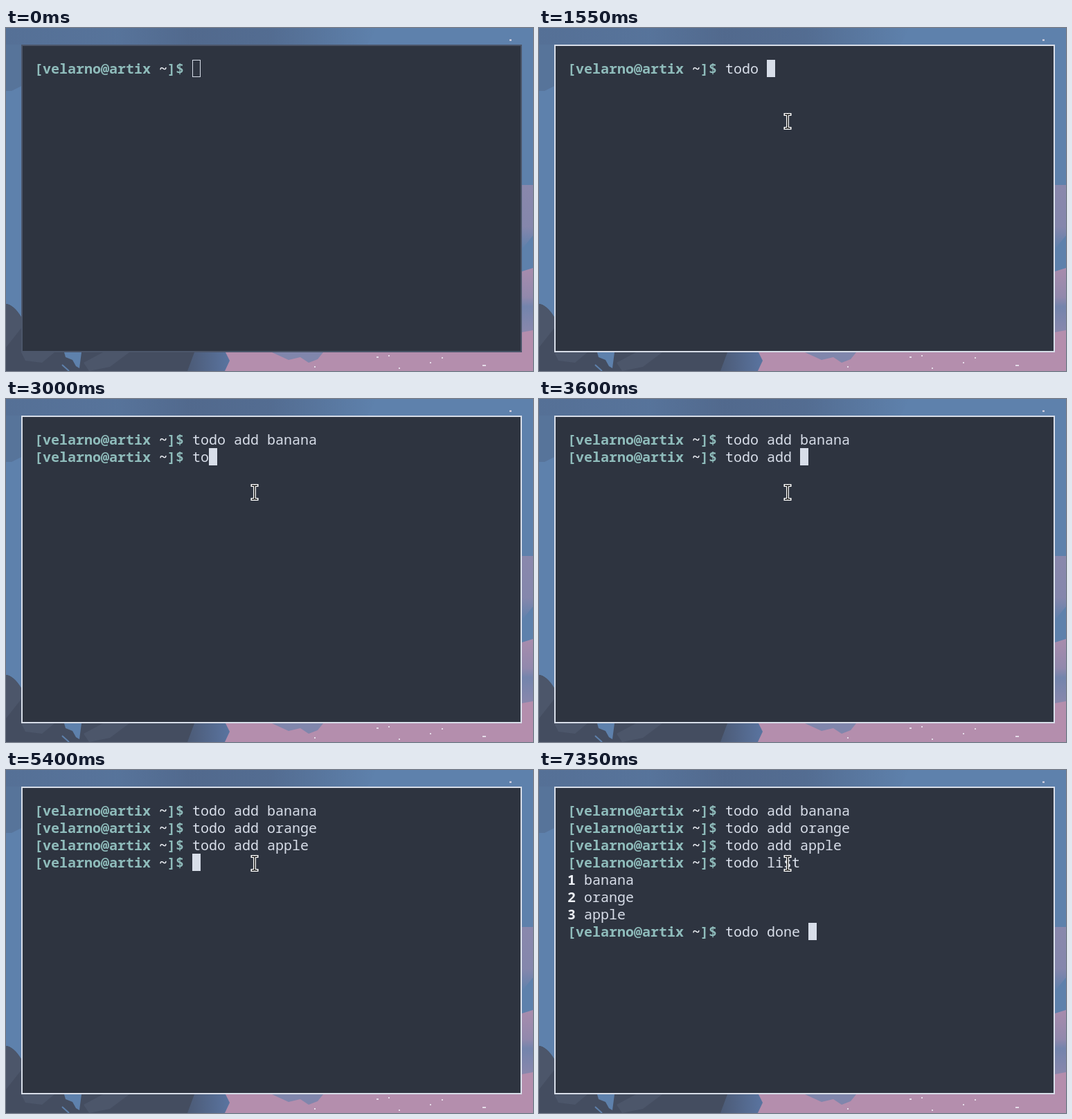
An HTML page that plays this animation: 761 by 496 pixels, repeating every 8 s.

```html
<!DOCTYPE html>
<html lang="en">
<head>
<meta charset="utf-8">
<title>Todo in the terminal</title>
<style>
  html, body { margin: 0; width: 100%; height: 100%; overflow: hidden; background: #5e81ac; }
  svg, #term, #screen, #cursor { position: absolute; box-sizing: border-box; }
  svg { left: 0; top: 0; }
  #term { left: 22px; top: 24px; width: 723px; height: 445px; background: #2e3440; border: 2px solid #4c566a; }
  #screen { left: 41px; top: 46px; margin: 0; color: #d8dee9; font: 20px/25px "Noto Sans Mono", monospace; }
  b { color: #eceff4; }
  b.p { color: #8fbcbb; }
  #cursor { width: 12px; height: 25px; border: 1px solid #d8dee9; }
  .focus #term { border-color: #d8dee9; }
  .focus #cursor { background: #d8dee9; }
  #mouse { visibility: hidden; }
  .focus #mouse { visibility: visible; }
</style>
</head>
<body>
<svg width="761" height="496">
  <defs>
    <linearGradient id="haze">
      <stop offset="0" stop-color="#4c5f80" stop-opacity=".5"/>
      <stop offset=".3" stop-color="#4c5f80" stop-opacity=".4"/>
      <stop offset=".5" stop-color="#4c5f80" stop-opacity=".7"/>
      <stop offset=".72" stop-color="#4c5f80" stop-opacity=".6"/>
      <stop offset="1" stop-color="#4c5f80" stop-opacity="0"/>
    </linearGradient>
    <linearGradient id="cloud" x2="0" y2="1">
      <stop offset="0" stop-color="#b48ead" stop-opacity=".5"/>
      <stop offset=".65" stop-color="#b48ead" stop-opacity=".45"/>
      <stop offset="1" stop-color="#b48ead" stop-opacity="0"/>
    </linearGradient>
    <linearGradient id="glow" x2="0" y2="1">
      <stop offset="0" stop-color="#b48ead" stop-opacity=".85"/>
      <stop offset=".45" stop-color="#b48ead" stop-opacity=".6"/>
      <stop offset=".6" stop-color="#b48ead" stop-opacity=".25"/>
      <stop offset="1" stop-color="#b48ead" stop-opacity=".5"/>
    </linearGradient>
    <linearGradient id="slope">
      <stop offset="0" stop-color="#444d60"/>
      <stop offset="1" stop-color="#5a74a0"/>
    </linearGradient>
  </defs>
  <path fill="url(#haze)" d="M0 0H535L522 24H0Z"/>
  <path fill="#4c5f80" opacity=".4" d="M0 24H22V84L8 91H0Z"/>
  <path fill="url(#cloud)" d="M745 227H761V300L745 320Z"/>
  <path fill="url(#glow)" d="M745 352L761 347V440H745Z"/>
  <path fill="#b48ead" d="M316 469H745V440L761 437V496H316Z"/>
  <path fill="#5e81ac" opacity=".6" d="M384 469H458L450 479L437 484L425 476L408 480Z"/>
  <path fill="url(#slope)" d="M230 469H317L323 481L316 496H230Z"/>
  <path fill="#444d60" d="M0 399Q11 400 22 418V469H272L262 496H0Z"/>
  <path fill="#4c566a" d="M0 399Q11 400 22 418V434L0 462ZM22 469H70L52 484L28 481ZM112 484L140 469H178L150 490L120 496Z"/>
  <path fill="#5e81ac" d="M84 469H109L106 492L101 489L96 480L86 476Z"/>
  <path stroke="#5e81ac" stroke-width="2" d="M81 487L91 496"/>
  <path stroke="#e5dce8" stroke-width="2" d="M727 17.500h3M445 490h2M535 476h3M552 474h2M567 492h2M612 484h2M629 477h2M688 488h5"/>
</svg>
<div id="term"></div>
<pre id="screen"></pre>
<div id="cursor"></div>
<svg id="mouse" width="12" height="26" fill="none">
  <path id="beam" stroke="#fff" stroke-width="4" d="M2.500 3H5L6 4L7 3H9.500M6 4V22M2.500 23H5L6 22L7 23H9.500" stroke-linecap="square"/>
  <path stroke="#111" stroke-width="1.500" d="M2 3H5L6 4L7 3H10M6 4V22M2 23H5L6 22L7 23H10"/>
</svg>
<script>
const LOOP = 8000, TICK = 50, CELL = 12, ROW = 25, LEFT = 41, TOP = 46;
const FOCUS = 450, SETTLED = 600;
const PROMPT = '<b class="p">[velarno@artix</b> <b>~</b><b class="p">]$</b> ';
const PROMPT_LEN = 19;

// Each command: tick the prompt appears, text, tick of every key press.
const commands = [
  { at: 0, text: 'todo add banana',
    keys: [26, 27, 28, 30, 31, 39, 41, 43, 45, 47, 48, 49, 50, 52, 53] },
  { at: 56, text: 'todo add orange',
    keys: [59, 60, 61, 65, 66, 68, 69, 71, 72, 73, 75, 76, 78, 79, 81] },
  { at: 83, text: 'todo add apple',
    keys: [87, 88, 89, 91, 92, 93, 94, 96, 97, 99, 100, 102, 103, 105] },
  { at: 108, text: 'todo list', output: ['banana', 'orange', 'apple'],
    keys: [111, 112, 114, 115, 116, 118, 119, 119, 121] },
  { at: 125, text: 'todo done ',
    keys: [134, 135, 136, 138, 139, 142, 143, 144, 146, 147] }
];

const get = id => document.getElementById(id);
const screen = get('screen'), cursor = get('cursor'), mouse = get('mouse');
let shown = -1;

function place(el, x, y) {
  el.style.left = x + 'px';
  el.style.top = y + 'px';
}

function draw(tick) {
  const lines = [];
  let typed = 0;
  commands.forEach((cmd, i) => {
    if (tick < cmd.at) return;
    typed = cmd.keys.filter(k => k <= tick).length;
    lines.push(PROMPT + cmd.text.slice(0, typed));
    const next = commands[i + 1];
    if (cmd.output && tick >= next.at)
      cmd.output.forEach((item, n) => lines.push(`<b>${n + 1}</b> ${item}`));
  });
  screen.innerHTML = lines.join('\n');
  place(cursor, LEFT + CELL * (PROMPT_LEN + typed), TOP + ROW * (lines.length - 1));

  const time = tick * TICK;
  document.body.className = time >= FOCUS ? 'focus' : '';
  const left = Math.max(0, Math.min(1, (SETTLED - time) / (SETTLED - FOCUS))) ** 2;
  place(mouse, 353 + 60 * left, 122 + 70 * left);
}

function frame() {
  const tick = Math.floor(performance.now() % LOOP / TICK);
  if (tick !== shown) draw(shown = tick);
  requestAnimationFrame(frame);
}
frame();
</script>
</body>
</html>
```
